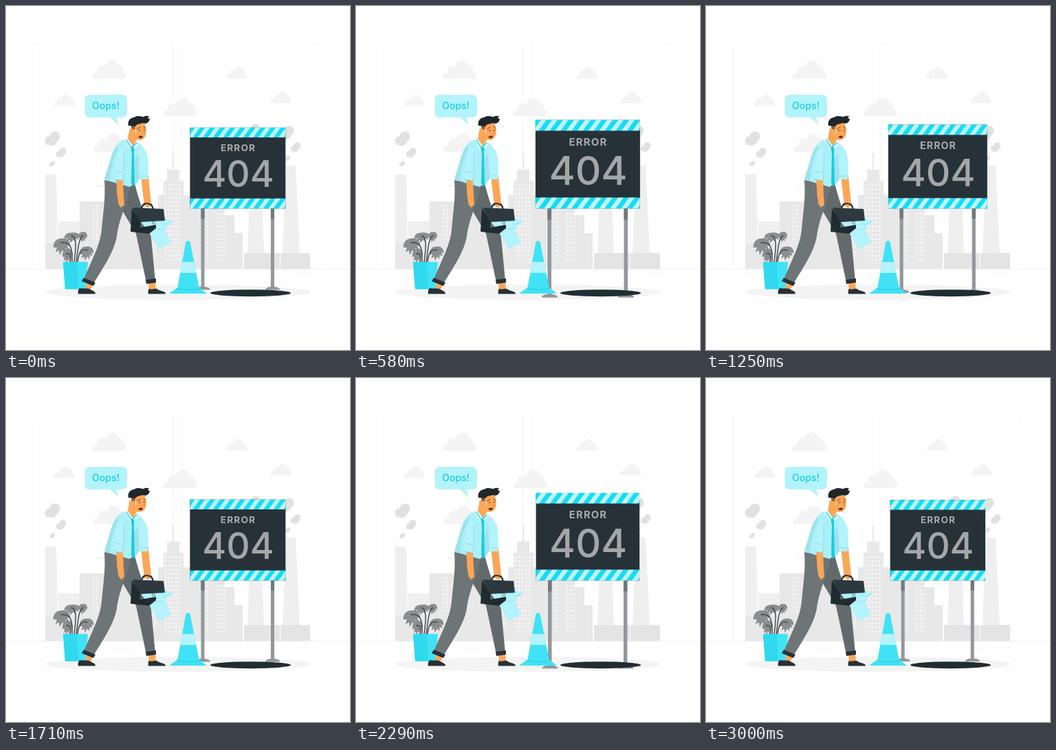
An HTML page for the animation above (3.04 s loop, 500 by 500 pixels).

```html
<!DOCTYPE html>
<html lang="en">
<head>
<meta charset="utf-8">
<title>404</title>
<style>
html, body { margin: 0; width: 100%; height: 100%; overflow: hidden; background: #fff; }
svg { display: block; width: 100vw; height: 100vh; }
text { font-family: Inter, "Open Sans", sans-serif; text-anchor: middle; }
.c { fill: #41e2f5; }
.l { fill: #b3f3fb; }
.d { fill: #263238; }
.skin { fill: #fca657; }
.trousers { fill: #6d7576; }
.line { fill: none; stroke-linecap: round; stroke-linejoin: round; }
</style>
</head>
<body>
<svg viewBox="0 0 500 500">
<defs>
  <pattern id="stripes" x="65.6" width="14.6" height="20" patternUnits="userSpaceOnUse" patternTransform="skewX(-36)">
    <rect width="14.6" height="20" fill="#16dcf4"/><rect width="7.1" height="20" fill="#c0f5fb"/>
  </pattern>
  <pattern id="panes" width="5" height="6" patternUnits="userSpaceOnUse">
    <rect x="1" y="1" width="2.400" height="3" fill="#f6f6f6"/>
  </pattern>
  <path id="cloud" d="M2 28C-2 24 2 18 8 19C6 12 13 7 19 10C21 -1 36 -2 39 9C44 9 46 13 45 17C51 18 51 26 47 28Z"/>
  <path id="puff" d="M0 15C-1 10 3 7 6 8C7 1 16 -2 20 3C23 8 21 13 18 14C16 20 10 23 6 20C2 21 0 18 0 15Z"/>
  <path id="leaf" d="M12 1C18 -1 25 4 24 12L20 11L22 17L17 15L17 22L13 18L9 25L8 18L3 21L5 14L0 14C-1 6 5 0 12 1Z"/>
</defs>

<g fill="none" stroke="#f9f9f9">
  <path d="M39.500 382V55.500H242.500V382M255.500 382V55.500H457V382"/>
  <path d="M0 382.500H500" stroke="#f0f0f0"/>
  <path d="M57 391.500H92M150 396.500H188M391 397H406M417 391.500H448"/>
</g>

<g fill="#f4f4f4">
  <use href="#cloud" x="125" y="78"/>
  <use href="#cloud" x="228" y="132"/>
  <use href="#cloud" x="127" y="184"/>
  <use href="#cloud" transform="translate(69 128) scale(.62)"/>
  <use href="#cloud" transform="translate(320 88) scale(.62)"/>
  <use href="#cloud" transform="translate(384 124) scale(.62)"/>
</g>
<g fill="#e1e1e1">
  <use href="#puff" x="57" y="182"/>
  <use href="#puff" transform="translate(73 206) scale(.68)"/>
  <use href="#puff" transform="translate(63 225) scale(.38)"/>
  <use href="#puff" transform="translate(349 171) scale(.95)"/>
  <use href="#puff" transform="translate(398 174) scale(.95)"/>
  <use href="#puff" transform="translate(414 198) scale(.66)"/>
  <use href="#puff" transform="translate(405 217) scale(.38)"/>
</g>

<g fill="#efefef">
  <path d="M57 382V245H73L76 382ZM401 382L407 232H421L428 382ZM350 382L356 232H370L376 382Z"/>
  <path d="M76 382V313H107V382Z"/>
</g>
<g fill="#e8e8e8">
  <path d="M57 382V345H107V284H150V262H133V261H165V382Z"/>
  <path d="M165 382V290H193V300H221V275H229V254H234V238H242V214H244V238H252V254H258V275H268V290H284V250H318V304H332V330H344V382Z"/>
</g>
<path fill="#e4e4e4" d="M346 382V359H398V382ZM399 382V359H442V382Z"/>
<path fill="url(#panes)" d="M124 290H134V342H124ZM231 258H256V374H231ZM287 274H294V370H287ZM303 300H318V370H303ZM196 306H218V365H196Z"/>
<ellipse cx="250" cy="416" rx="193" ry="11" fill="#f4f4f4"/>

<g id="sign">
  <g fill="#92979a">
    <path d="M283.700 294H288.700V408H283.700ZM384.700 294H389.700V408H384.700Z"/>
    <path d="M276 412C276 409 280 407.500 286 407.500S297 409 297 412ZM377 412C377 409 381 407.500 387 407.500S398 409 398 412Z"/>
  </g>
  <path d="M283.700 294H288.700V309H283.700ZM384.700 294H389.700V309H384.700Z" fill="#70787c"/>
  <rect class="d" x="267.700" y="177.300" width="138.300" height="117"/>
  <rect width="138.300" height="14.200" fill="url(#stripes)" transform="translate(267.700 177.300)"/>
  <rect width="138.300" height="14.500" fill="url(#stripes)" transform="translate(267.700 279.800)"/>
  <text x="337.500" y="211.500" font-size="13.600" font-weight="700" letter-spacing="1.100" fill="#a9abac">ERROR</text>
  <text x="337.500" y="263.500" font-size="53" font-weight="500" fill="#a4a6a7">404</text>
</g>
<ellipse cx="355.500" cy="417.200" rx="58.500" ry="5" fill="#212d33"/>

<g id="cone">
  <path class="c" d="M237 418L249 409.500H281L292 418ZM261.500 342.500Q264.500 340.500 267.500 342.500L281 411Q265 414 249 411Z"/>
  <path class="l" d="M255.700 372H273.300L276.500 388H252.300Z"/>
  <path d="M249 411Q265 414 281 411" class="line" stroke="#1ccfe4"/>
</g>

<g id="plant">
  <g fill="#8b8d8e">
    <use href="#leaf" transform="translate(85 329) scale(.95 .62)"/>
    <use href="#leaf" transform="translate(69 337)"/>
    <use href="#leaf" transform="translate(82 352) scale(.62 .9)"/>
    <use href="#leaf" transform="translate(105 328) scale(.55 .65)"/>
    <use href="#leaf" transform="translate(107 349) scale(.85)"/>
  </g>
  <g class="line" stroke="#3b464b" stroke-width="1.400">
    <path d="M96 373C97 352 94 342 80 344M99 373C102 350 103 334 95 334M102 373C105 350 106 336 112 334M104 373C105 360 109 352 118 355M93 373C95 364 93 358 88 360"/>
  </g>
  <path class="c" d="M83 372H119L116 411.500H86Z"/>
  <path d="M83 372H103L105 411.500H86Z" fill="#30d9ee"/>
</g>

<g id="man">
  <path class="skin" d="M196 247L207 247C208 262 210 275 211 287L207 293L201 290Z"/>
  <path class="skin" d="M118 400L127 403L122 414H114ZM207 400H217L218 414H208Z"/>
  <path d="M164 272L187 257C193 285 207 315 211 337L217 400L204 402L189 331L166 292Z" fill="#626a6c"/>
  <path class="trousers" d="M143 253L181 260C177 288 165 305 161 335C157 358 140 382 127 404L113 398C124 370 137 348 139 325C141 300 145 280 143 253Z"/>
  <path class="d" d="M113 395L130 402L127 407L110 400ZM203 398L218 396V402L204 404Z"/>
  <path class="d" d="M107 410C112 411 117 410 121 411C125 414 130 414 130 418.500H105C104 415 105 412 107 410ZM208 411C213 413 216 410 219 411C224 415 232 414 232 418.500H207C206 415 207 412 208 411Z"/>

  <path d="M172 194C160 199 156 208 151 226L143 252Q160 258 180 263L193 252H206C208 233 206 212 201 208C197 202 192 198 188 195Z" fill="#abf0f8"/>
  <path d="M163 208C155 222 152 240 151 254L143 252L151 226C154 213 158 206 163 203Z" fill="#9de3eb"/>
  <path class="l" d="M192 206C196 220 194 238 193 252H206C208 232 206 212 201 208Z"/>
  <path d="M192 216L194 251L187 262V222Z" fill="#9de3eb"/>
  <path d="M181 205L184.500 204L186.500 208L186 212L187 258L184.500 263L182 257L183 213Z" fill="#1cc9df"/>
  <path class="skin" d="M180 177L191 190L190 198L185 204L177 193Z"/>
  <path d="M176 192L184 204L180 209L172 195ZM190 195L193 203L187 207L185 203Z" fill="#d6fafe"/>
  <path class="line" d="M175 195L182 206L190 199" stroke="#1cc9df" stroke-width="1.200"/>

  <path class="skin" d="M182 170L198 167C203 171 205 180 203 188C201 194 195 196 190 194C186 192 184 189 182 183Z"/>
  <path d="M181 172H188L186.500 182L183 180Z" fill="#8a5a3c"/>
  <ellipse class="skin" cx="184.500" cy="182" rx="2.500" ry="3.500"/>
  <path d="M178 174C176 167 181 162 186 162C191 158 197 161 200 161C203 159 206 160 208 160L206 163L209 164C208 170 204 172 198 170C194 172 190 171 188 175L180 174Z" fill="#20272b"/>
  <path d="M192 191Q195 187 199 189.500L198 192Q194 192.500 192 191Z" fill="#64302e"/>
  <path class="line" d="M191 178.500L195 176M200 175.500L203 178" stroke="#5c392d" stroke-width=".9"/>
  <path d="M193 181H195.500M200.500 180.500H202" stroke="#263238" stroke-width="1.200"/>
  <path class="line" d="M199 179L201.500 185L199 186" stroke="#d9793d" stroke-width=".7"/>
  <path class="line" d="M188.500 180V185" stroke="#c5f8ff"/>

  <path class="skin" d="M160 249H170L171 276L172 289L167 293L163.500 288L161.500 275Z"/>
  <path class="l" d="M164 208C159 222 158 238 158 252L170 254C173 239 172 218 172 207Z"/>
  <path class="line" d="M171 213C172 228 171 242 170 254L158 252M168 242L159 240M195 247H206" stroke="#83d7e2" stroke-width=".8"/>
</g>

<g id="bag">
  <path class="l" d="M196 314L229 307L242 313L231 324L240 344L222 353L207 328Z"/>
  <path class="line" d="M218 325L231 324M223 309L230 318L242 313" stroke="#8cdfe9" stroke-width=".7"/>
  <path class="line" d="M197 296C197 290 201 287 205 287C210 286 213 290 214 296" stroke="#263238" stroke-width="2.300"/>
  <path d="M183 294L196 313L195 322L218 318V323L208 331L181 328Z" fill="#202b30"/>
  <path d="M184 293L229 295L231 312L195 314Z" fill="#2d393f"/>
  <circle cx="214.500" cy="315" r="2" fill="none" stroke="#6b7a80"/>
  <path class="skin" d="M202 283L210 283L210 291L206 293L202 290Z"/>
  <path d="M199 289Q203 285 211 289" class="line" stroke="#263238" stroke-width="2"/>
</g>

<g id="speech">
  <path class="l" d="M122 129H168Q176 129 176 137V154Q176 162 168 162H160L164 173L151 162H122Q114.500 162 114.500 154V137Q114.500 129 122 129Z"/>
  <text x="145" y="150" font-size="14.200" font-weight="500" fill="#19cfe5">Oops!</text>
</g>
</svg>

<script>
const LOOP = 3040, CX = 336.85, CY = 294.4;
// [time in ms, sign scale]
const keys = [[0, 1.004], [570, 1.1], [1690, 1.002], [2375, 1.1], [3000, 1], [LOOP, 1.004]];
const sign = document.getElementById("sign");

function scaleAt(t) {
  const i = keys.findIndex(k => k[0] > t);
  const [t0, s0] = keys[i - 1], [t1, s1] = keys[i];
  return s0 + (s1 - s0) * (t - t0) / (t1 - t0);
}

function draw() {
  const s = scaleAt(performance.now() % LOOP);
  sign.setAttribute("transform", `translate(${CX} ${CY}) scale(${s}) translate(${-CX} ${-CY})`);
  requestAnimationFrame(draw);
}
draw();
</script>
</body>
</html>
```
